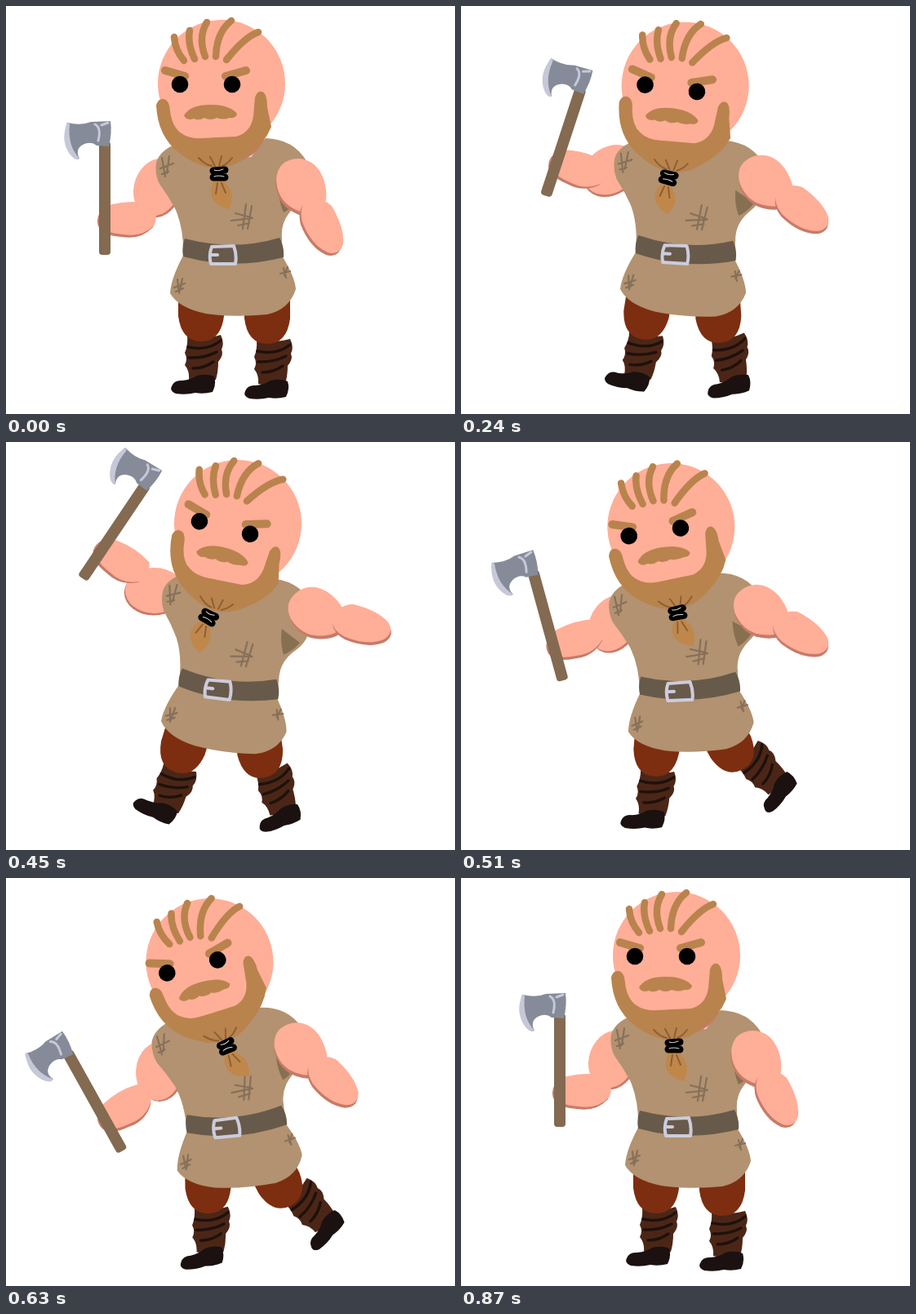
An HTML page for the animation above (900 ms loop, 550x500 px).

```html
<!DOCTYPE html>
<html lang="en">
<head>
<meta charset="utf-8">
<title>Axe swing</title>
<style>
  html, body { margin: 0; width: 100%; height: 100%; overflow: hidden; background: #fff; }
  svg { display: block; width: 550px; height: 500px; }
  .skin { fill: #ffae98; }
  .shade { fill: #c97a67; }
  .hair { fill: #b9834d; }
  .line { fill: none; stroke-linecap: round; stroke-linejoin: round; }
</style>
</head>
<body>
<svg viewBox="0 0 550 500">
  <defs>
    <path id="thigh" fill="#7d2e10" d="M211 340V380Q215 411 239 411Q263 411 267 380V340Z"/>
    <g id="boot">
      <path fill="#4b2617" d="M222 404Q243 409 263 403Q268 413 264 421Q267 428 260 436Q260 448 257 458Q240 463 224 458Q225 447 219 440Q223 433 219 425Q223 416 222 404Z"/>
      <path class="line" stroke="#1e110c" stroke-width="3.5" d="M223 418Q247 423 263 410M224 431Q242 432 258 424M229 444Q243 444 254 436"/>
    </g>
    <path id="foot" fill="#1a1110" d="M203 466Q206 458 216 459Q227 458 234 453Q246 450 255 454Q258 463 253 473Q242 476 232 474Q220 477 208 475Q200 472 203 466Z"/>
    <path id="bicep" d="M331 212Q333 188 358 187Q380 188 389 212Q397 238 386 250Q372 260 350 247Q332 236 331 212Z"/>
    <path id="wrist" d="M366 241Q384 231 399 245Q415 272 413 292Q409 306 394 302Q374 293 363 265Q359 249 366 241Z"/>
    <path id="grip" d="M114 262Q113 247 130 243Q156 237 178 243Q187 254 182 268Q167 284 144 280Q115 278 114 262Z"/>
    <ellipse id="shoulder" cx="185" cy="222" rx="28" ry="36" transform="rotate(20 185 222)"/>
  </defs>

  <g id="hips">
    <g id="legL">
      <use href="#boot"/>
      <g id="footL"><use href="#foot"/></g>
      <use href="#thigh"/>
    </g>
    <g id="legR">
      <g id="shinR">
        <use href="#boot" x="85" y="5"/>
        <use href="#foot" x="90" y="6"/>
      </g>
      <use href="#thigh" x="81" y="3"/>
    </g>
  </g>

  <g id="upperL">
    <use href="#shoulder" class="shade" x="2" y="2"/>
    <use href="#shoulder" class="skin"/>
  </g>
  <g id="foreL">
    <use href="#grip" class="shade" x="-2" y="3"/>
    <use href="#grip" class="skin"/>
    <rect x="114" y="166" width="14" height="139" rx="4" fill="#836a50"/>
    <path fill="#858b99" d="M75 143Q92 147 104 142L128 141Q130 156 126 172L111 171Q104 165 94 170Q84 176 90 187Q84 190 78 180Q68 163 75 143Z"/>
    <path fill="#c6c8d8" d="M76 142Q66 162 77 180Q84 190 90 187Q75 171 78 145Z"/>
    <path class="line" stroke="#c6c8d8" stroke-width="3" d="M109 145Q117 149 113 165M117 146L125 143"/>
  </g>

  <g id="torso">
    <path fill="#b29270" d="M184 192Q188 178 206 170L250 190L300 185L318 162Q352 163 368 190Q374 228 354 246Q336 262 338 284V306Q354 332 355 347Q347 372 320 378Q280 382 245 377Q211 370 201 352Q202 334 217 306Q218 272 207 248Q199 233 188 218Q182 206 184 192Z"/>
    <path class="shade" d="M280 192Q306 186 317 163L296 166Z"/>
    <path fill="#877052" d="M334 222L358 236Q350 248 340 253Q334 240 334 222Z"/>
    <path class="line" stroke="#87705a" stroke-width="2.2" d="M191 186L195 209M200 184L197 205M189 199L205 193M191 206L199 203
      M294 243L290 273M301 245L296 273M276 263L302 260M281 254L300 259M284 269L298 266
      M210 335L212 352M216 334L213 349M206 345L219 340M208 350L217 346
      M340 321L343 333M345 320L341 330M336 328L348 325"/>
    <path fill="#685a4a" d="M219 285Q278 301 335 284Q341 294 340 308Q278 324 217 307Q215 295 219 285Z"/>
    <path class="line" stroke="#cdccdc" stroke-width="4" d="M252 295L279 294Q283 305 281 316L251 316Q248 305 252 295ZM251 305H259"/>
    <g id="upperR">
      <use href="#bicep" class="shade" x="-1" y="4"/>
      <use href="#bicep" class="skin"/>
      <g id="foreR">
        <use href="#wrist" class="shade" x="-2" y="3"/>
        <use href="#wrist" class="skin"/>
      </g>
    </g>
  </g>

  <g id="skull">
    <circle class="skin" cx="264" cy="95" r="78"/>
    <path class="line" stroke="#b9834d" stroke-width="8.5" d="M206 38Q207 54 218 67M225 30Q222 46 231 65M246 20Q235 38 244 62M276 18Q258 32 257 62M309 32Q292 38 270 66"/>
  </g>
  <g id="beard">
    <path class="skin" d="M193 118Q205 168 258 172Q300 166 312 110Z"/>
    <path class="hair" d="M184 122Q186 113 193 114Q200 115 201 128Q203 148 215 156Q224 163 240 162L282 160Q300 155 303 135L305 112Q308 103 314 105Q320 108 320 124L325 148Q317 168 298 182Q278 199 258 199Q236 198 212 180Q186 160 184 122Z"/>
    <path class="hair" d="M218 134Q226 121 250 121Q274 121 283 132Q282 138 274 137Q266 140 258 137Q250 141 243 137Q236 141 230 138Q221 141 218 134Z"/>
    <path class="line" stroke="#8c6034" stroke-width="2" d="M236 186Q243 194 252 196M250 185L256 196M264 184L261 196M277 186Q272 193 265 196"/>
  </g>
  <g id="eyes">
    <path class="line" stroke="#b9834d" stroke-width="10" d="M195 79L219 86M269 86L294 79"/>
    <circle cx="213" cy="96" r="10.3"/>
    <circle cx="277" cy="96" r="10.3"/>
  </g>
  <g id="braid">
    <path fill="#c0874b" d="M256 213Q248 224 252 235Q258 246 273 249Q280 235 274 223L266 213Z"/>
    <path class="line" stroke="#8c6034" stroke-width="2" d="M259 217L257 230M264 217L269 229"/>
    <path class="line" stroke="#000" stroke-width="9" d="M254 202L268 201M254 210L268 210"/>
    <path class="line" stroke="#ddd" stroke-width="1" d="M255 201Q259 203 266 200M255 209Q260 207 267 209"/>
  </g>
</svg>
<script>
const LOOP = 900, STEP = 30;
const clamp = (v, low, high) => Math.max(low, Math.min(high, v));

function move(id, dx, dy, angle = 0, pivotX = 0, pivotY = 0) {
  document.getElementById(id).setAttribute('transform',
    `translate(${dx} ${dy}) rotate(${angle} ${pivotX} ${pivotY})`);
}
const turn = (id, x, y, angle) => move(id, 0, 0, angle, x, y);

function pose(t) {
  // effort builds up, holds through the strike and fades; lean flips from back (1) to front (-1)
  const effort = clamp(Math.min(t / 450, (870 - t) / 330), 0, 1);
  const lean = effort * clamp((495 - t) / 45, -1, 1);

  move('hips', -11 * lean, 0);
  turn('legL', 250, 340, 9 * lean + 8 * effort);
  turn('footL', 243, 456, 10 * lean);
  turn('legR', 305, 365, 15 * lean - 23 * effort);
  turn('shinR', 300, 384, 7 * lean - 16 * effort);

  turn('torso', 278, 257, 7 * lean);
  turn('upperR', 333, 192, -15 * lean - 23 * effort);
  turn('foreR', 365, 215, -3 * lean - 12 * effort);
  move('upperL', -3 * lean, -30 * lean - 10 * effort, 45 * lean + 25 * effort, 185, 222);
  move('foreL', -2 * lean - 10 * effort, -58 * lean - 44 * effort, 37 * lean - 3 * effort, 172, 262);

  const tilt = 17 * lean - 3 * effort;
  move('skull', 20 * lean, 8 * effort - 3 * lean, 10 * lean, 264, 95);
  move('beard', 13 * lean + 2 * effort, 8 * effort, tilt, 250, 131);
  move('eyes', 23 * lean, 13 * effort - 4 * lean, tilt, 245, 96);
  move('braid', -13 * lean, 5 * effort + 4 * lean, 30 * lean, 261, 206);
}

function tick() {
  pose(Math.floor(performance.now() % LOOP / STEP) * STEP);
  requestAnimationFrame(tick);
}
tick();
</script>
</body>
</html>
```
